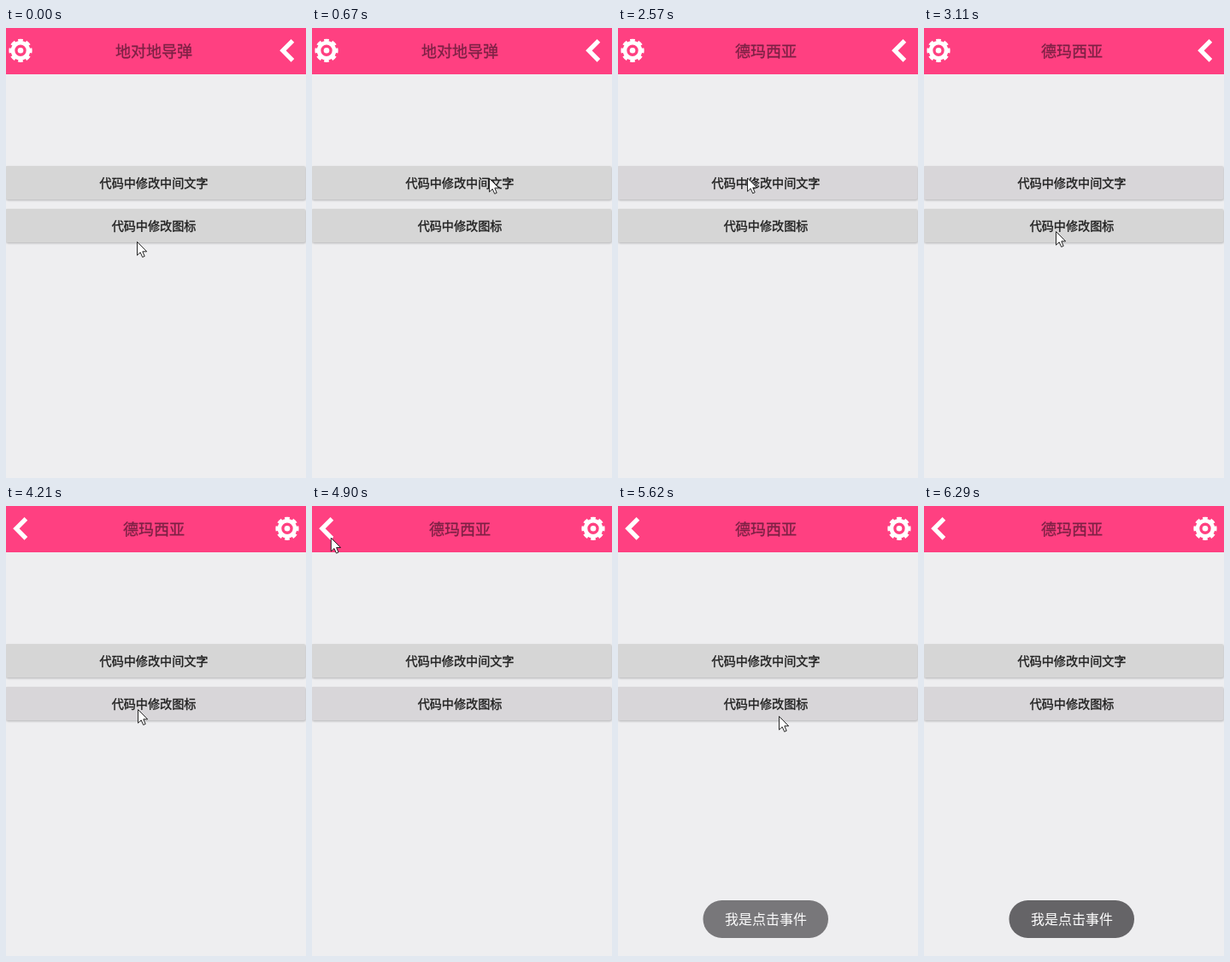
Animation, 351 px wide and 525 px high, one loop 6630 ms. Source, as an HTML page:

```html
<!DOCTYPE html>
<html lang="zh-CN">
<meta charset="utf-8">
<style>
  html, body { margin: 0; width: 100%; height: 100%; overflow: hidden; background: #eeeef0; }
  svg { display: block; }
  text { font-family: "Noto Sans CJK SC", "Noto Sans CJK", sans-serif; text-anchor: middle; }
  #title { fill: #7d2145; stroke: #7d2145; stroke-width: .3px; }
  #buttons text { fill: #222; stroke: #222; stroke-width: .4px; }
</style>
<svg width="351" height="525" viewBox="0 0 351 525">
  <defs>
    <filter id="blur" x="-5%" y="-30%" width="110%" height="160%"><feGaussianBlur stdDeviation="1"/></filter>
  </defs>
  <rect width="351" height="54" fill="#ff4081"/>
  <text id="title" x="173" y="33.8" font-size="18"></text>
  <g id="gear" fill="none" stroke="#fff">
    <circle r="3.3" fill="#fff" stroke="none"/>
    <circle r="9" stroke-width="4.6"/>
    <circle r="11.8" stroke-width="3.6" pathLength="16" stroke-dasharray="1.2 .8" stroke-dashoffset=".6"/>
  </g>
  <path id="arrow" d="M6.4-11.5-5.1 0 6.4 11.5" fill="none" stroke="#fff" stroke-width="5.2"/>
  <g id="buttons"></g>
  <g id="toast">
    <rect x="99.5" y="460" width="146.5" height="44" rx="22" fill="#656467"/>
    <text x="173" y="488.3" font-size="16" fill="#fff">我是点击事件</text>
  </g>
  <path id="cursor" d="M.5.5V16.2L4.2 12.8 6.7 18.4 9.2 17.3 6.8 11.8H11.7Z" fill="#fff" stroke="#111" stroke-width=".9"/>
</svg>
<script>
const $ = id => document.getElementById(id);
const LOOP = 6630, STEP = 130;

const progress = (t, start, steps) =>
  t < start ? 0 : Math.min(1, (Math.floor((t - start) / STEP) + 1) / steps);
const linear = p => p;
const easeOut = p => 1 - (1 - p) ** 2;
const easeInOut = p => (1 - Math.cos(Math.PI * p)) / 2;

const rest = { x: 153, y: 249 };
const moves = [
  { start: 150, steps: 4, x: 272, y: 199, ease: linear },
  { start: 670, steps: 1, x: 207, y: 175, ease: linear },
  { start: 790, steps: 3, x: 148, y: 172, ease: easeOut },
  { start: 2570, steps: 2, x: 154, y: 177, ease: linear },
  { start: 2830, steps: 3, x: 154, y: 237, ease: easeOut },
  { start: 4360, steps: 6, x: 18, y: 31, ease: easeOut },
  { start: 5620, steps: 3, x: 324, y: 416, ease: easeOut },
  { start: 6020, steps: 3, x: 351, y: 525, ease: easeOut }
];

function pointerAt(t) {
  let { x, y } = rest;
  for (const move of moves) {
    const p = move.ease(progress(t, move.start, move.steps));
    x += (move.x - x) * p;
    y += (move.y - y) * p;
  }
  return [x, y];
}

const place = (id, x, y) => $(id).setAttribute('transform', `translate(${x} ${y})`);

function addButton(y, label) {
  $('buttons').insertAdjacentHTML('beforeend', `<g>
    <rect x="0" width="351" height="39.3" rx="2.5" filter="url(#blur)"/>
    <rect x="-1" y="${y}" width="351.5" height="39" rx="2.5"/>
    <text x="173" y="${y + 25.2}" font-size="14.1">${label}</text></g>`);
  const [shadow, face] = $('buttons').lastElementChild.children;
  return (raised, tinted) => {
    shadow.setAttribute('y', y + (raised ? 2.5 : 1));
    shadow.setAttribute('opacity', raised ? .28 : .22);
    face.setAttribute('fill', tinted ? '#d8d6d9' : '#d6d6d6');
  };
}
const textButton = addButton(161, '代码中修改中间文字');
const iconButton = addButton(211, '代码中修改图标');

function draw(t) {
  const renamed = t >= 1870, swapped = t >= 3820;
  $('title').textContent = renamed ? '德玛西亚' : '地对地导弹';
  place('gear', swapped ? 329 : 17, 26.3);
  place('arrow', swapped ? 17 : 329, 26.3);
  textButton(renamed && t < 1990, renamed && !swapped);
  iconButton(swapped && t < 3940, swapped);
  $('toast').setAttribute('opacity', easeInOut(progress(t, 5350, 4)));
  place('cursor', ...pointerAt(t));
}

function tick() {
  draw(performance.now() % LOOP);
  requestAnimationFrame(tick);
}
tick();
</script>
</html>
```
